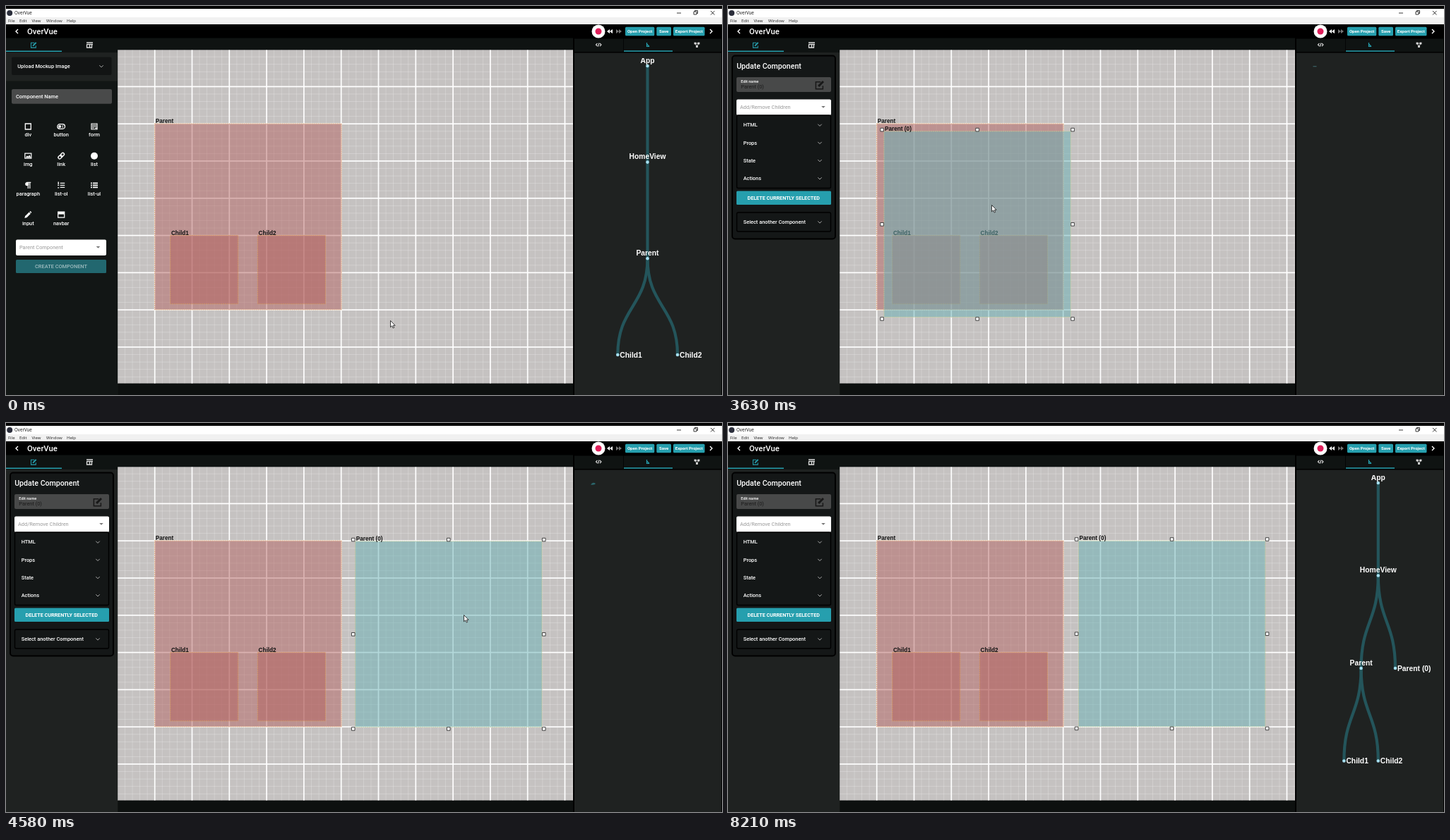
An HTML page with a canvas that plays this animation: 1014x552 px, repeating every 8.61 s.

```html
<!DOCTYPE html>
<html lang="en">
<head>
<meta charset="utf-8">
<title>OverVue</title>
<style>
html, body { margin: 0; width: 100%; height: 100%; overflow: hidden; background: #000; }
canvas { display: block; }
</style>
</head>
<body>
<canvas id="stage" width="1014" height="552"></canvas>
<script>
const g = document.getElementById('stage').getContext('2d');
const LOOP = 8610, SELECT = 775, PASTE = 2470, SWITCH = 3432, DROP = 4770;
const TEAL = '#269fae', PANE = '#1f2221', DARK = '#121615';
const ROSE = 'rgba(176,92,90,.47)', AQUA = 'rgba(105,178,182,.5)';
const UI = 'Roboto, sans-serif', SYS = '"Open Sans", sans-serif', ARIAL = '"Liberation Sans", Arial, sans-serif';
const SIZE = 264.5;

// Pointer path: time, x, y
const path = [
  [300, 544, 446], [SELECT, 423, 271], [2720, 423, 271], [2860, 412.5, 271.5], [3000, 412.5, 271.5],
  [3340, 373, 282], [3700, 373, 282], [3820, 490, 278], [3910, 601, 274], [4000, 645.5, 273],
  [4100, 645.5, 273], [4580, 648, 272], [7880, 648, 272], [8117, 168, 342]
];

function pointer(t) {
  const i = path.findIndex(k => k[0] > t);
  if (i === 0) return path[0].slice(1);
  if (i < 0) return path[path.length - 1].slice(1);
  const a = path[i - 1], b = path[i], p = (t - a[0]) / (b[0] - a[0]);
  return [a[1] + (b[1] - a[1]) * p, a[2] + (b[2] - a[2]) * p];
}

function rect(x, y, r, b, fill, radius = 0, stroke, width = 1) {
  g.beginPath();
  g.roundRect(x, y, r - x, b - y, radius);
  if (fill) { g.fillStyle = fill; g.fill(); }
  if (stroke) { g.strokeStyle = stroke; g.lineWidth = width; g.stroke(); }
}

function text(s, x, y, { size = 7.4, weight = 500, color = '#fff', font = UI, align = 'left' } = {}) {
  g.font = `${weight} ${size}px ${font}`;
  g.fillStyle = color;
  g.textAlign = align;
  g.fillText(s, x, y + size * 0.355);
}

function line(d, color = '#fff', width = 1, x = 0, y = 0) {
  g.save();
  g.translate(x, y);
  g.strokeStyle = color;
  g.lineWidth = width;
  g.stroke(new Path2D(d));
  g.restore();
}

function shape(d, color = '#fff', x = 0, y = 0) {
  g.save();
  g.translate(x, y);
  g.fillStyle = color;
  g.fill(new Path2D(d));
  g.restore();
}

function dot(x, y, r, color) {
  g.fillStyle = color;
  g.beginPath();
  g.arc(x, y, r, 0, 7);
  g.fill();
}

const chevron = (x, y) => line('M-2.7-1.3L0 1.4L2.7-1.3', '#bbb', 0.9, x, y);
const caret = (x, y) => shape('M-2.8-1.3h5.6L0 1.5z', '#777', x, y);
const button = (s, x, r) => {
  rect(x, 29.8, r, 42.3, TEAL, 1.5);
  text(s, (x + r) / 2, 35.8, { size: 6.1, weight: 700, align: 'center' });
};
const pencil = (x, y, color, k) => {
  g.save();
  g.translate(x, y);
  g.scale(k, k);
  line('M1-3.5H-4.5V4.5H3.5V1', color, 1.2);
  line('M-1.5 1.5L4-4', color, 2.3);
  g.restore();
};

function chrome() {
  rect(0, 0, 1014, 552, '#000');
  rect(0, 4, 1014, 16, '#fff');
  rect(0, 16, 1014, 26, '#f1f1f1');
  dot(5.2, 10, 4, '#2b2e3b');
  text('OverVue', 12, 10, { size: 6.2, weight: 400, color: '#111', font: SYS });
  [['File', 3], ['Edit', 19], ['View', 36.5], ['Window', 57], ['Help', 86]].forEach(([s, x]) =>
    text(s, x, 21, { size: 6, weight: 400, color: '#222', font: SYS }));
  line('M950 10h6M974 8h4v4h-4zM975.5 8V6.5h4v4H978M998 7l5.5 5.5M1003.5 7L998 12.5', '#222', 0.9);

  line('M17 33l-3 3 3 3M997 33l3 3-3 3', '#fff', 1.4);
  text('OverVue', 30, 36.3, { size: 11.3 });
  dot(839, 36, 9.5, '#fff');
  dot(839, 36, 4.5, '#e01e5a');
  shape('M855 33v6l-4-3zM859 33v6l-4-3z', '#fff');
  shape('M864 33v6l4-3zM868 33v6l4-3z', '#777');
  button('Open Project', 877, 918.3);
  button('Save', 921.3, 942);
  button('Export Project', 945, 989.5);

  rect(0, 45.5, 803, 66, '#0f1312');
  rect(158.5, 535, 803, 552, '#0d100f');
  rect(0, 66, 158.5, 552, PANE);
  rect(0, 63.6, 79, 65, TEAL);
  pencil(39.3, 55.3, TEAL, 0.85);
  line('M114.5 55v4h7v-4M114 52h9M114 54.5h9M118.5 55v4', '#ddd', 1.3);

  rect(805, 46.5, 1013, 65, '#0f1312');
  rect(805, 66.5, 1013, 552, PANE);
  rect(874.3, 46, 875, 65, '#000');
  rect(875, 63.3, 944, 64.7, TEAL);
  line('M837.5 53l-2 2 2 2M841 53l2 2-2 2M840 52.5l-1.5 5', '#ddd', 1.1);
  line('M907.5 52v5.5h3.5M908 54.5l3 3', TEAL, 1.2);
  line('M976 53h5L978.5 57.5z', '#ddd', 0.9);
  [[976, 53], [981, 53], [978.5, 57.5]].forEach(([x, y]) => rect(x - 1.4, y - 1.4, x + 1.4, y + 1.4, '#ddd'));
}

const icons = {
  div: () => line('M-4-4h8v8h-8z', '#fff', 1.3),
  button: () => { rect(-5.3, -3.3, 5.3, 3.3, null, 3.3, '#fff', 1.3); dot(-2, 0, 2, '#fff'); line('M2-1.8v3.6', '#fff', 1); },
  form: () => line('M-4-4h8v8h-8zM-3-2h6M-3 0h6M-3 2h3M1 2.3h2.5', '#fff', 1.2),
  img: () => { line('M-4.5-3.5h9v7h-9z', '#fff', 1.2); shape('M-3.5 2.5l2-3 1.5 1.5 2-2.5L4 2.5z'); },
  link: () => {
    g.rotate(-Math.PI / 4);
    rect(-5.2, -2, 0.8, 2, null, 2, '#fff', 1.4);
    rect(-0.8, -2, 5.2, 2, null, 2, '#fff', 1.4);
  },
  list: () => dot(0, 0, 5, '#fff'),
  paragraph: () => { dot(-1.5, -1.8, 2.6, '#fff'); line('M-2-4h6M0-4v8.5M2.5-4v8.5', '#fff', 1.2); },
  'list-ol': () => line('M-1.5-3h6.5M-1.5 0h6.5M-1.5 3h6.5M-4-5v3.5M-5 0h2M-5 3.5h2', '#fff', 1.4),
  'list-ul': () => line('M-2-3h7M-2 0h7M-2 3h7M-5-3h2M-5 0h2M-5 3h2', '#fff', 1.6),
  input: () => { line('M-3 3L2.5-2.5', '#fff', 3); shape('M-5 5l1-3.5 2.5 2.5zM2-4l1.3-1L5-3.3 4-2z'); },
  navbar: () => { line('M-4.5-4h9v8h-9z', '#fff', 1.2); rect(-4.5, -4, 4.5, -0.5, '#fff'); }
};

function createPanel() {
  rect(0, 106.5, 158.5, 552, DARK);
  rect(8, 72.5, 149.5, 98, '#121414', 2);
  text('Upload Mockup Image', 16.3, 85.3);
  chevron(135, 85.5);
  rect(8, 118, 150, 138.8, '#494a4a', 2);
  text('Component Name', 14, 128);
  Object.entries(icons).forEach(([name, draw], i) => {
    const x = [31.3, 78.2, 125][i % 3], y = 171 + 41.7 * Math.floor(i / 3);
    g.save();
    g.translate(x, y);
    draw();
    g.restore();
    text(name, x, y + 11.8, { align: 'center' });
  });
  rect(14, 331.5, 142, 354, '#fff', 2);
  text('Parent Component', 19, 342.5, { weight: 400, color: '#999' });
  caret(130.5, 342.3);
  rect(14, 360, 142, 379, '#22676f', 1.5);
  text('CREATE COMPONENT', 78, 369.2, { color: '#9dbcbf', align: 'center' });
}

function updatePanel(copy) {
  rect(6, 70.5, 152, 330.5, '#141717', 4, '#000', 2);
  text('Update Component', 12.2, 84.8, { size: 10.6 });
  rect(12, 101, 146, 122, '#484949', 2);
  if (copy) {
    text('Edit name', 18.3, 106.8, { size: 5.6 });
    text('Parent (0)', 18.3, 114, { weight: 400, color: '#1c1c1c' });
  } else text('Edit name', 18.3, 111);
  pencil(130, 112, '#181818', 1.25);
  rect(12, 132.5, 146, 155, '#fff', 2);
  if (copy) text('Add/Remove Children', 17, 143.5, { weight: 400, color: '#999' });
  else [17, 62].forEach((x, i) => {
    rect(x, 137, x + 40, 149, '#41b883', 2);
    text('Child' + (i + 1), x + 5, 142.8);
    line('M-1.3-1.3l2.6 2.6M1.3-1.3l-2.6 2.6', '#26694b', 0.9, x + 34, 143);
  });
  caret(135, 143.3);
  rect(12.5, 155, 145.5, 258.5, null, 2, '#000', 1.4);
  ['HTML', 'Props', 'State', 'Actions'].forEach((s, i) => {
    text(s, 21.7, 168.7 + 25.2 * i);
    chevron(130, 169 + 25.2 * i);
  });
  rect(12, 262.5, 146, 282, TEAL, 1.5);
  text('DELETE CURRENTLY SELECTED', 78.7, 272, { size: 7.2, weight: 700, align: 'center' });
  rect(12.5, 293, 145.5, 320, null, 2, '#000', 1.4);
  text('Select another Component', 21.7, 306.5);
  chevron(130, 306.7);
}

function grid() {
  rect(158.5, 62.5, 803, 535.5, '#c5c2c1');
  g.save();
  g.clip();
  for (let i = 0; i < 62; i++) {
    const major = i % 5 === 0, w = major ? 1.7 : 0.8, d = i * 10.56;
    g.fillStyle = major ? '#fff' : 'rgba(255,255,255,.27)';
    g.fillRect(157.9 + d - w / 2, 62, w, 474);
    g.fillRect(158, 61.6 + d - w / 2, 646, w);
  }
  g.restore();
}

function box(name, x, y, w, h, active) {
  rect(x, y, x + w, y + h, active ? AQUA : ROSE);
  g.setLineDash([2, 1]);
  rect(x, y, x + w, y + h, null, 0, active ? 'rgba(205,205,140,.75)' : 'rgba(222,160,88,.75)', 0.9);
  g.setLineDash([]);
  text(name, x + 1.2, y - 3.8, { size: 8.2, weight: 700, color: '#111', font: ARIAL });
}

function handles(x, y) {
  for (let i = 0; i < 9; i++) {
    if (i === 4) continue;
    const cx = x - 2.8 + (i % 3) * 135, cy = y - 2.2 + Math.floor(i / 3) * 134.2;
    rect(cx - 2.3, cy - 2.3, cx + 2.3, cy + 2.3, '#fff', 0, '#333', 0.9);
  }
}

function tree(nodes, p = 1) {
  const at = ([, x, y]) => [829 + (x - 829) * p, 85 + (y - 85) * p];
  g.save();
  g.beginPath();
  g.rect(805, 74, 208, 478);
  g.clip();
  nodes.forEach(n => {
    if (n[3] === undefined) return;
    const [x, y] = at(nodes[n[3]]), [cx, cy] = at(n), m = (y + cy) / 2;
    line(`M${x} ${y}C${x} ${m} ${cx} ${m} ${cx} ${cy}`, '#24555b', 4.2);
  });
  nodes.forEach((n, i) => {
    const [x, y] = at(n), leaf = !nodes.some(k => k[3] === i);
    dot(x, y, 2.3, '#a5dff0');
    g.globalAlpha = p;
    text(n[0], leaf ? x + 3 : x, leaf ? y + 0.2 : y - 7.8, { size: 10.3, weight: 700, font: ARIAL, align: leaf ? 'left' : 'center' });
    g.globalAlpha = 1;
  });
  g.restore();
}

// Label, x, y, index of parent
const before = [['App', 908.5, 85], ['HomeView', 908.5, 221.6, 0], ['Parent', 908.5, 358.2, 1],
  ['Child1', 866.3, 495, 2], ['Child2', 951, 495, 2]];
const after = [['App', 920.8, 85], ['HomeView', 920.8, 216.5, 0], ['Parent', 896.6, 348, 1],
  ['Parent (0)', 945, 348, 1], ['Child1', 872.4, 479.5, 2], ['Child2', 920.8, 479.5, 2]];

function drawTree(t) {
  if (t < PASTE) tree(before);
  else if (t >= DROP) {
    const u = Math.min(1, (t - DROP + 60) / 700);
    tree(after, u < 0.5 ? 4 * u ** 3 : 1 - 4 * (1 - u) ** 3);
  } else if (t > 3530) {
    if (t < 3950) line('M828.5 85.7h5', '#3d6468', 1.2);
    else shape('M828 87.5q3-4.5 7-1.5-1 2.5-7 1.5z', '#2b666b');
  }
}

function frame(now) {
  const t = now % LOOP, [mx, my] = pointer(t);
  const copied = t >= PASTE, copyActive = t >= SWITCH;
  chrome();
  if (t < SELECT) createPanel(); else updatePanel(copyActive);
  grid();

  const active = t >= SELECT && !copyActive;
  box('Parent', 210.6, 167, SIZE, 264, active);
  box('Child1', 232.7, 325.5, 96, 97.3);
  box('Child2', 356.4, 325.5, 96, 97.3);
  let x = 220.9, y = 177.8;
  if (t >= DROP) { x = 496.4; y = 167.2; }
  else if (t > 3640) { x += (mx - 373) * 0.995; y += my - 282; }
  if (copied) box('Parent (0)', x, y, SIZE, 263.7, copyActive);
  if (copyActive) handles(x, y);
  else if (active) handles(210.6, 167);

  drawTree(t);
  if (t < 8200) {
    const arrow = 'M0 0V9.3L2.2 7.3 3.7 10.6 5.2 9.9 3.8 6.8H6.6z';
    shape(arrow, '#fff', mx + 0.5, my + 0.5);
    line(arrow, '#111', 0.8, mx + 0.5, my + 0.5);
  }
  requestAnimationFrame(frame);
}
requestAnimationFrame(frame);
</script>
</body>
</html>
```
